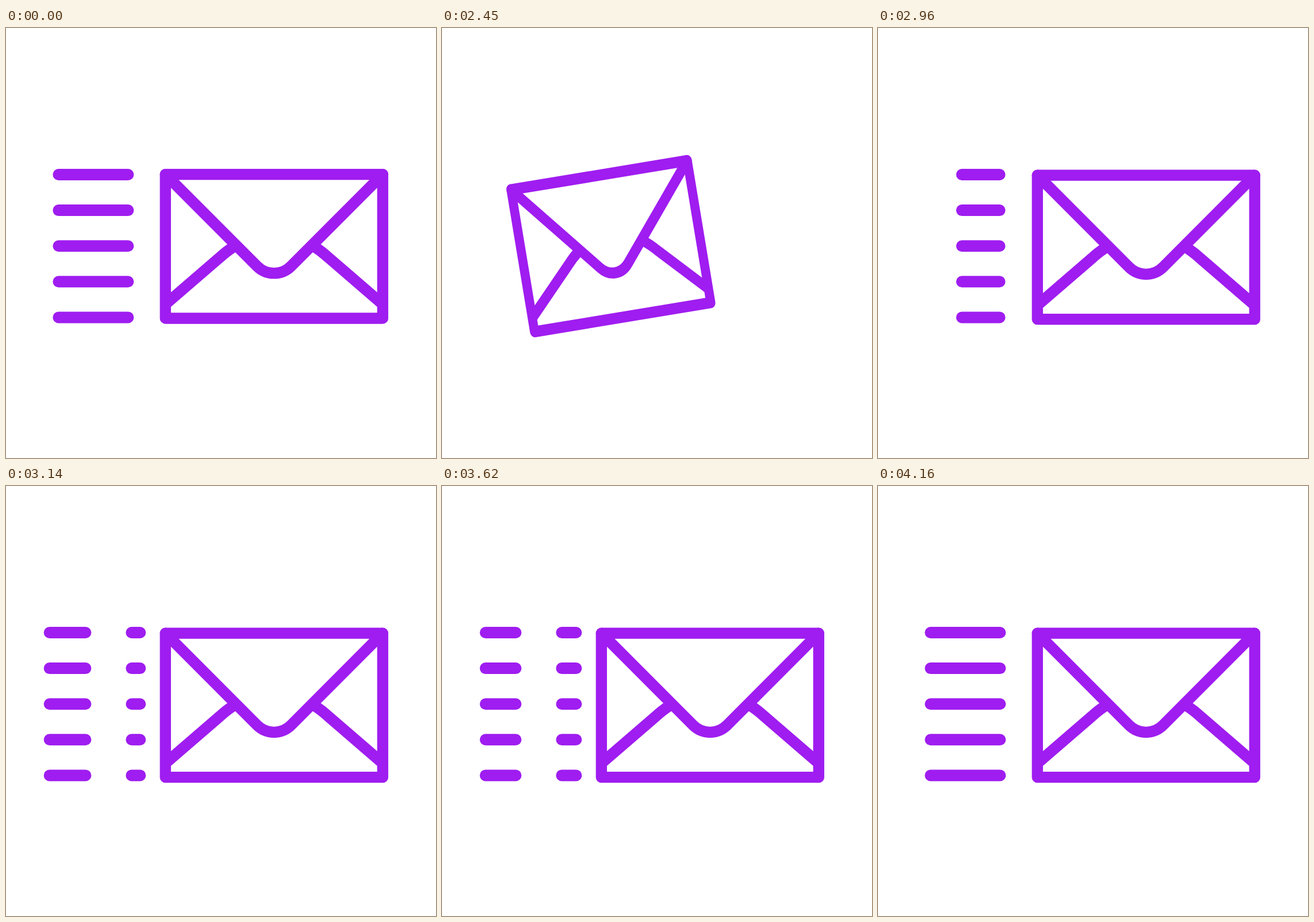
An HTML page that plays this animation: 748 px wide and 748 px high, repeating every 4.22 s.

```html
<!DOCTYPE html>
<html lang="en">
<head>
<meta charset="utf-8">
<title>Sending mail</title>
<style>
  html, body { margin: 0; width: 100%; height: 100%; overflow: hidden; background: #fff; }
  svg { display: block; width: 100vw; height: 100vh; }
  path { fill: none; stroke: #9f1df0; stroke-linecap: round; stroke-linejoin: round; }
  #trails { stroke-width: 20; }
  #envelope { stroke-width: 19.3; }
</style>
</head>
<body>
<svg viewBox="0 0 748 748">
  <path id="trails"/>
  <g id="envelope">
    <path d="M-189-125.2H189V125.2H-189Z"/>
    <path d="M-189-125.2L-29.6 34.6A41.8 41.8 0 0 0 29.6 34.6L189-125.2"/>
    <path id="fold" d="M-185.3 97.7L-94 19Q-83 9-73 2.5"/>
    <path d="M185.3 97.7L94 19Q83 9 73 2.5"/>
  </g>
</svg>
<script>
  const LOOP = 4220, REST = 2030, STEP = 30, LAST = 71;
  const LEFT = 75.7, SPAN = 157.6;           // track the trails run along
  const IDLE = { from: 91.4, length: 121 };  // trails at rest
  const trails = document.getElementById('trails');
  const envelope = document.getElementById('envelope');

  const unit = (k, a, b) => Math.min(1, Math.max(0, (k - a) / (b - a)));
  const mix = (a, b, u) => a + (b - a) * u;
  const inOut = u => u < .5 ? 4 * u ** 3 : 1 - 4 * (1 - u) ** 3;
  const out = u => 1 - (1 - u) ** 2;

  // How far the envelope is pulled back: 0 at rest, 1 fully
  const pull = k => k <= 14 ? inOut(unit(k, -12.8, 14)) : 1 - inOut(unit(k, 14, 27));

  // Pieces of one trail as [start, end]
  function pieces(k) {
    if (k < 20) {
      const left = 1 - inOut(unit(k, -12.8, 13.6));
      return left > 0 ? [[IDLE.from, IDLE.from + IDLE.length * left]] : [];
    }
    const length = k < 24 ? mix(0, 24, unit(k, 20, 24))
      : k < 53 ? mix(24, 77.6, unit(k, 24, 33))
      : mix(77.6, IDLE.length, unit(k, 53, LAST));
    if (length <= 0) return [];
    const middle = k < 37 ? mix(113.5, -58, (k - 24) / 13)
      : k < 53 ? mix(-58, -225.7, unit(k, 37, 53))
      : mix(-225.7, IDLE.from + IDLE.length / 2 - 3 * SPAN, out(unit(k, 53, LAST)));
    const offset = middle - length / 2 - LEFT;
    const start = LEFT + (offset % SPAN + SPAN) % SPAN;
    const end = start + length, right = LEFT + SPAN;
    return end > right ? [[start, right], [LEFT, end - SPAN]] : [[start, end]];
  }

  function draw(t) {
    const resting = t < REST;
    const k = Math.min(LAST, Math.floor((t - REST) / STEP));
    const p = resting ? 0 : pull(k);
    const shake = !resting && k >= 27 && k % 2 ? 1.6 : 0;
    envelope.setAttribute('transform',
      `translate(${466.3 - 172.5 * p} ${379.8 + shake - .3 * p}) rotate(${-9.4 * p}) scale(${1 - .178 * p} 1)`);

    const parts = resting ? [[IDLE.from, IDLE.from + IDLE.length]] : pieces(k);
    let d = '';
    for (let row = 0; row < 5; row++)
      for (const [a, b] of parts) d += `M${a} ${255 + 62.1 * row}H${b}`;
    trails.setAttribute('d', d);
  }

  function tick() {
    draw(performance.now() % LOOP);
    requestAnimationFrame(tick);
  }
  tick();
</script>
</body>
</html>
```
